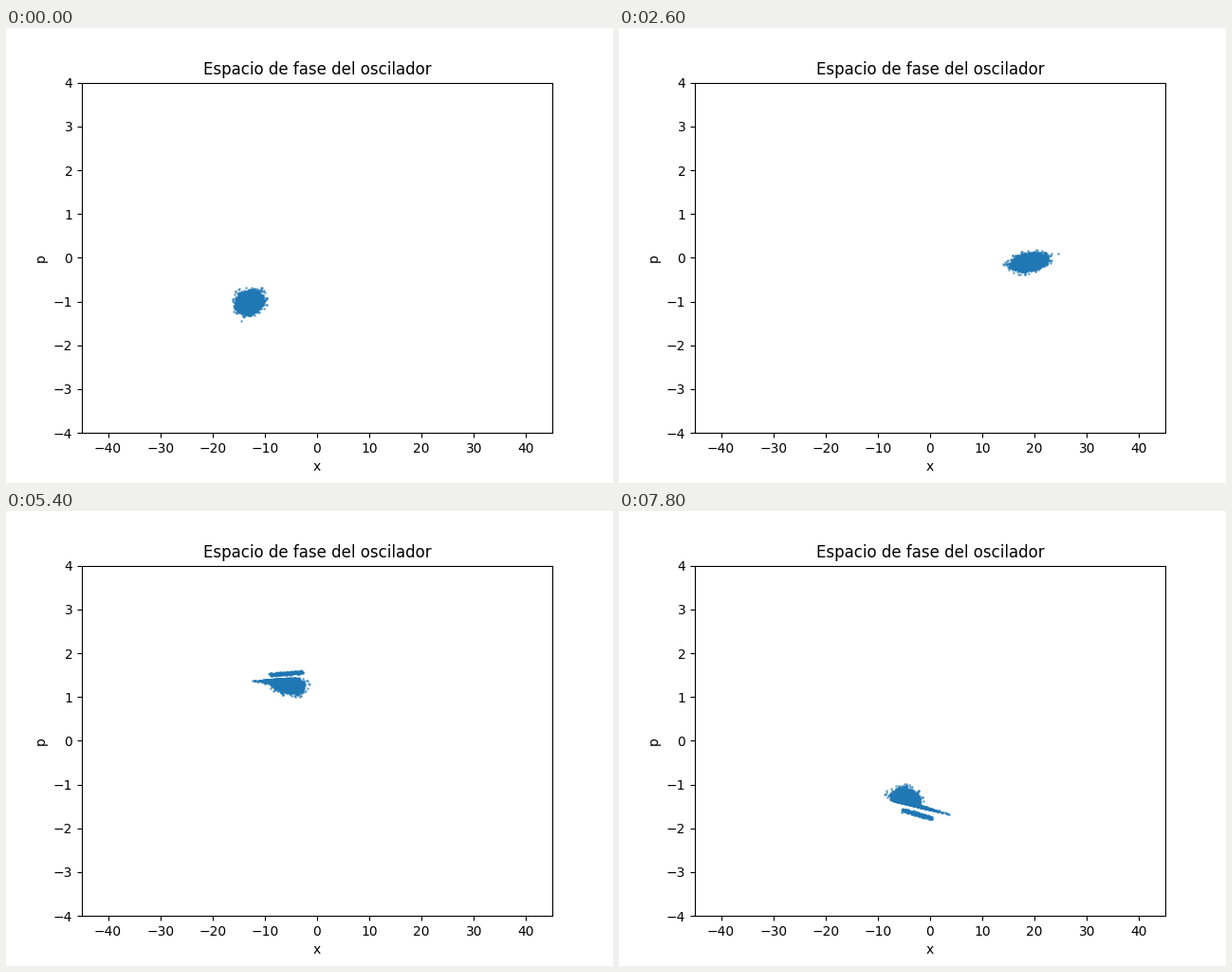
Animation of 640x480 px, one loop 8 s. Source, as a matplotlib script:

```python
import numpy as np
import matplotlib.pyplot as plt
from matplotlib.animation import FuncAnimation

plt.rcParams["text.kerning_factor"] = 6    # whole-pixel kerning

FRAMES, STEP = 40, 200
AX, AP = 18.65, 1.366          # semi-axes of the mean orbit
START, TURN = -136.5, 17.72    # phase in degrees, degrees per frame
N = 6000

# Co-rotating frame: u is the radial deviation, v the lead along the orbit
rng = np.random.default_rng(7)
g1, g2, g3 = rng.standard_normal((3, N))
u, v = 0.071 * g1, 0.055 * g2
excess = np.maximum(u - 0.05, 0)
band = 2.7 * u + v > 0.33      # fast particles that split off
along = 0.5 * np.tanh(1.2 * (g1 - 1.85) - 0.3 * g2)


def ramp(i, a, b):
    return np.clip((i - a) / (b - a), 0, 1)


def cloud(i):
    # energetic particles lag more and more and form a tail
    lag = 3.5 * ramp(i, 18, 37)
    rad = 1.015 + u - 0.1 * lag * excess
    tan = v / (1 + 2 * lag * excess) - 0.25 * u - lag * excess

    # leading edge pressed flat, later released
    press = ramp(i, 13, 17) - ramp(i, 19, 27)
    over = press * np.maximum(tan + 2.8 * (rad - 1.024) - 0.197, 0)
    rad = rad - 0.2 * over
    tan = tan - 0.45 * over

    # outer band drifts away from the tail
    w = ramp(i, 19, 24) * band
    age = i - 27
    band_r = 1.17 + 0.004 * age + 0.065 * along + 0.012 * g3
    band_t = 0.05 - 0.019 * age - 0.35 * along
    rad = rad + w * (band_r - rad)
    tan = tan + w * (band_t - tan)

    a = np.radians(START + TURN * i)
    x = AX * (rad * np.sin(a) + tan * np.cos(a))
    p = AP * (rad * np.cos(a) - tan * np.sin(a))
    return x, p


fig, ax = plt.subplots(figsize=(6.4, 4.8), dpi=100)
ax.set(xlim=(-45, 45), ylim=(-4, 4), xlabel="x", ylabel="p",
       title="Espacio de fase del oscilador")
dots, = ax.plot([], [], "o", markersize=1, alpha=0.5, color="tab:blue")


def update(i):
    dots.set_data(*cloud(i))
    return dots,


anim = FuncAnimation(fig, update, frames=FRAMES, interval=STEP,
                     init_func=lambda: update(0), repeat=True, repeat_delay=0)
plt.show()
```
